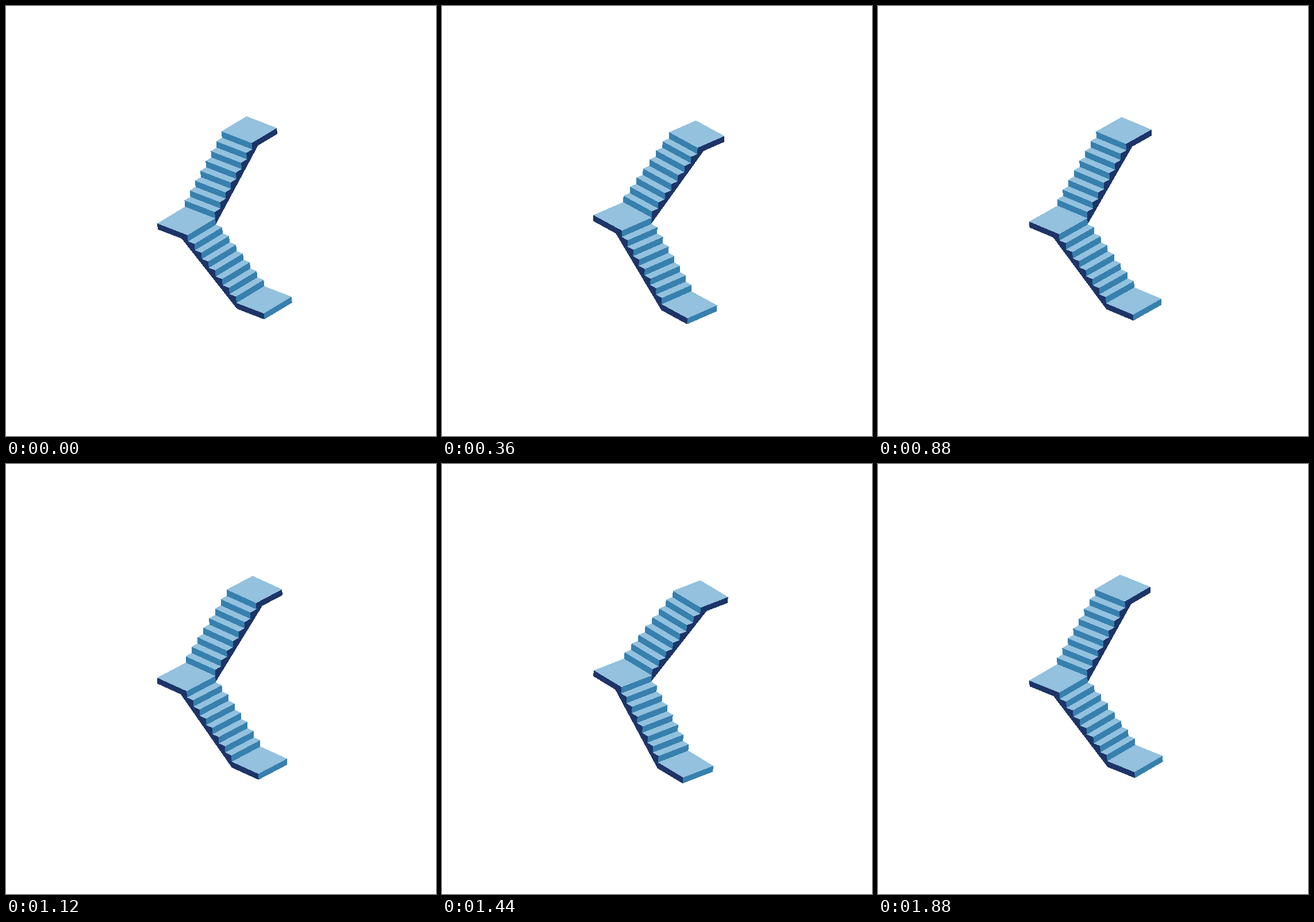
Recreate the animation shown at these times as an HTML page. Size 748 by 748 pixels, loop 1920 ms.

```html
<!DOCTYPE html>
<html>
<head>
<meta charset="utf-8">
<style>
  html, body { margin: 0; width: 100%; height: 100%; overflow: hidden; background: #fff; }
  svg { display: block; width: 100%; height: 100%; }
</style>
</head>
<body>
<svg viewBox="0 0 748 748" shape-rendering="crispEdges"><g id="stairs"></g></svg>
<script>
const LIGHT = '#93c1de', MID = '#3780ae', DARK = '#1d3468';
const W = 50.7;        // flight width
const D = 10.65;       // tread depth
const H = 11.05;       // riser height
const T = 10.3;        // slab thickness
const STEPS = 8;
const FLIGHT = W + (STEPS - 1) * D;
const END = FLIGHT + 45.8;
const LEFT = 263.1, MIDDLE = 368.6, SLOPE = 0.49;

const stairs = document.getElementById('stairs');

// i runs down-right, j runs up-right, z runs down the screen
const project = ([i, j, z]) => [LEFT + i + j, MIDDLE + SLOPE * (i - j) + z];

function face(color, points) {
  const el = document.createElementNS('http://www.w3.org/2000/svg', 'polygon');
  el.setAttribute('fill', color);
  el.setAttribute('points', points.map(project).join(' '));
  stairs.append(el);
}

const flat = (i0, i1, j0, j1, z) =>
  face(LIGHT, [[i0, j0, z], [i1, j0, z], [i1, j1, z], [i0, j1, z]]);
const riserDown = (i, z0, z1) =>
  face(MID, [[i, 0, z0], [i, W, z0], [i, W, z1], [i, 0, z1]]);
const riserUp = (j, z0, z1) =>
  face(MID, [[0, j, z0], [W, j, z0], [W, j, z1], [0, j, z1]]);

// Stepped outline as [distance, height] pairs
const steps = [];
for (let n = 0; n < STEPS; n++)
  steps.push([W + n * D, n * H], [W + n * D, (n + 1) * H]);
const bottom = STEPS * H;

// Dark side walls
face(DARK, [
  [0, 0], ...steps, [END, bottom], [END, bottom + T],
  [FLIGHT, bottom + T], [W - D, T], [0, T]
].map(([i, z]) => [i, 0, z]));
face(DARK, [
  ...steps.map(([j, z]) => [j, -z]), [END, -bottom], [END, T - bottom],
  [FLIGHT + D, T - bottom], [W, T]
].map(([j, z]) => [W, j, z]));

// Landing, then both flights
flat(0, W, 0, W, 0);
for (let n = 1; n <= STEPS; n++) {
  const from = W + (n - 1) * D, to = n < STEPS ? from + D : END;
  flat(0, W, from, to, -n * H);
  riserUp(from, -n * H, (1 - n) * H);
  flat(from, to, 0, W, n * H);
  riserDown(from, (n - 1) * H, n * H);
}
riserDown(END, bottom, bottom + T);

// Linear swing between -5 and 5 degrees, 24 ticks of 40 ms per cycle
function draw(now) {
  const tick = Math.floor(now / 40 + 0.01) % 24;
  const angle = 5 - 10 * Math.abs(tick - 12) / 12;
  stairs.setAttribute('transform', `rotate(${angle} 374 374)`);
  requestAnimationFrame(draw);
}
draw(0);
</script>
</body>
</html>
```
